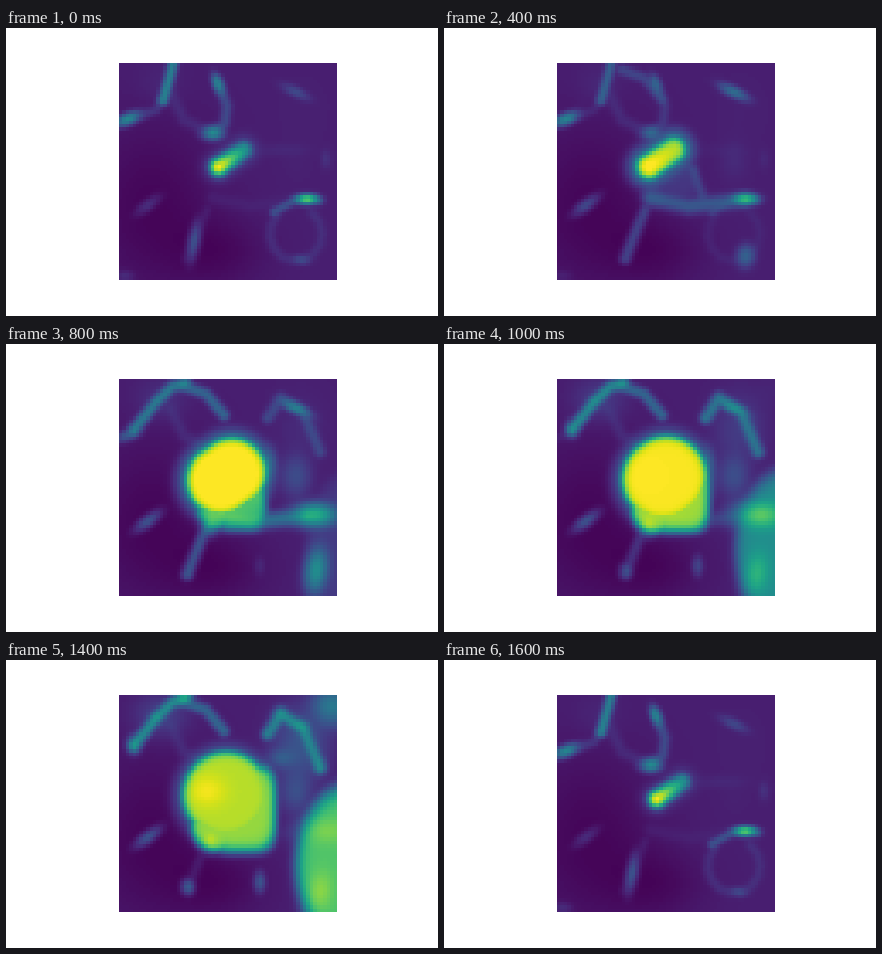
Write a matplotlib script that moves like this. It is 432 px wide and 288 px high and loops after 1700 ms.

```python
import numpy as np
import matplotlib.pyplot as plt
from matplotlib.animation import FuncAnimation

W, H = 432, 288
LEFT, TOP, WIDE, HIGH = 113, 35, 218, 217
CELLS = 64
FRAMES = 17

step = (np.arange(CELLS) + 0.5) / CELLS
X, Y = np.meshgrid(LEFT + WIDE * step, TOP + HIGH * step)


def rise(t, mid, spread=1.0):
    """Smooth change from 0 to 1 around a depth."""
    return 1 / (1 + np.exp(-(t - mid) / spread))


def peak(t, mid, width):
    return np.exp(-0.5 * ((t - mid) / width) ** 2)


def to_segment(p, q):
    """Distance to the segment and the position along it."""
    dx, dy = q[0] - p[0], q[1] - p[1]
    s = ((X - p[0]) * dx + (Y - p[1]) * dy) / (dx * dx + dy * dy + 1e-9)
    s = np.clip(s, 0, 1)
    return np.hypot(X - p[0] - s * dx, Y - p[1] - s * dy), s


def blob(x, y, sx, sy, amp, angle=0):
    a = np.radians(angle)
    u = (X - x) * np.cos(a) + (Y - y) * np.sin(a)
    v = (Y - y) * np.cos(a) - (X - x) * np.sin(a)
    return amp * np.exp(-0.5 * ((u / sx) ** 2 + (v / sy) ** 2))


def strand(points, amp, width=4.5):
    dist = np.min([to_segment(p, q)[0] for p, q in zip(points, points[1:])], axis=0)
    return amp * np.exp(-0.5 * (dist / width) ** 2)


def plateau(depth_inside, soft):
    return 1 / (1 + np.exp(-np.clip(depth_inside / soft, -50, 50)))


def box(x, y, rx, ry, amp, power=4, soft=2.5):
    """Flat-topped rounded box, or an ellipse when power is 2."""
    q = (np.abs((X - x) / rx) ** power + np.abs((Y - y) / ry) ** power) ** (1 / power)
    return amp * plateau((1 - q) * min(rx, ry), soft)


def nodule(t, late, last):
    """Two joined spots that swell into one round body, with its glow."""
    big = rise(t, 6.5, 1.3)
    radius = 8 + 36 * big
    x = 213 - 10 * peak(t, 5, 2) + 7 * big
    y = 139 - 4 * big
    reach = 1 - big ** 2
    dist, s = to_segment((x, y), (x + 25 * reach, y - 17 * reach))
    tip = 0.5 + 0.5 * rise(t, 3)
    level = (1 + (tip - 1) * s) * (1 - 0.13 * last)
    soft = 2.6
    body = level * plateau(radius - dist, soft) / rise(radius, 0, soft)

    fill = 0.95 * rise(t, 6.5, 1.5) - 0.12 * last
    corner = box(234 + 2 * last, 152 - 4 * last, 20 + 14 * late,
                 18 + 17 * rise(t, 6.5, 0.7) + 9 * last, fill)
    heel_r = 14 + 11 * late
    heel = box(210, 166, heel_r, heel_r, fill, power=2)
    glow = (0.15 + 0.25 * peak(t, 5.5, 2.5) + 0.1 * late) * plateau(radius + 9 - dist, 4.5)
    return np.maximum(np.maximum(body, corner), heel), glow


def upper_left(t, early, mid, late, last):
    return [
        strand([(167, 36), (163, 52), (157, 72)], 0.43 * early),
        strand([(157, 72), (150, 82), (134, 88)], 0.15 * early),
        blob(122, 91, 11, 5, 0.45 * (1 - late), angle=-22),
        strand([(128, 86), (150, 58), (166, 43), (179, 39)], 0.46 * rise(t, 6.3), 5),
        blob(178, 37, 8, 4, 0.5 * last),
        blob(128, 84, 6, 8, 0.35 * late),
        blob(150, 58, 7, 6, 0.3 * late),
        blob(155, 55, 25, 20, 0.08 + 0.1 * late),
        strand([(165, 65), (178, 92), (205, 105)], 0.11, 6),
        strand([(178, 42), (200, 50), (218, 71)], 0.32 * rise(t, 3.5), 5),
        blob(212, 56, 4.5, 9, 0.42 * early, angle=-22),
        strand([(211, 52), (221, 78), (219, 95), (208, 104)], 0.22 * early, 5),
        blob(207, 105, 9, 6, 0.45 * early),
    ]


def upper_right(t, early, mid, late, last):
    return [
        blob(290, 64, 14, 5, 0.2 + 0.2 * rise(t, 3) - 0.15 * last, angle=26),
        strand([(262, 74), (275, 54), (297, 68), (314, 108)], 0.42 * rise(t, 8), 5.5),
        blob(275, 54, 7, 7, 0.35 * last),
        blob(296, 67, 7, 7, 0.35 * last),
        blob(276, 98, 13, 9, 0.28 * last),
        blob(314, 105, 6, 8, 0.3 * last),
        blob(295, 85, 25, 35, 0.04 + 0.14 * late + 0.08 * last),
        blob(326, 46, 18, 18, 0.42 * last),
        blob(290, 132, 14, 20, 0.05 + 0.18 * rise(t, 5)),
        blob(320, 131, 5, 9, 0.13 * early),
        blob(275, 122, 30, 6, 0.09 * early),
        blob(263, 118, 7, 14, 0.3 * peak(t, 9, 2)),
    ]


def below(t, early, mid, late, last):
    return [
        strand([(201, 182), (190, 208), (181, 231)], 0.07 + 0.22 * mid),
        blob(188, 213, 4.5, 15, 0.26 * (1 - rise(t, 3)), angle=10),
        blob(182, 227, 5, 6, 0.28 * late),
        blob(204, 181, 7, 8, 0.5 * rise(t, 6.5)),
        strand([(207, 170), (245, 178), (300, 172)], 0.07 + 0.36 * mid, 7),
        strand([(249, 142), (258, 167)], 0.34 * mid, 5),
        blob(142, 177, 12, 4.5, 0.12 + 0.13 * rise(t, 3), angle=-36),
        blob(254, 222, 5, 9, 0.26 * late),
        blob(119, 248, 8, 5, 0.12 * early),
    ]


def lower_right(t, early, mid, late, last):
    ring = [(290 + 26 * np.cos(a), 206 + 27 * np.sin(a))
            for a in np.linspace(-0.9, 3.9, 12)]
    grown = rise(t, 7.5, 1.4)
    return [
        blob(301 + 20 * late, 171, 9 + 15 * grown, 4 + 10 * grown,
             0.74 - 0.15 * mid - 0.3 * last),
        strand([(268, 184), (288, 173), (314, 173)], 0.24 * early, 4),
        strand(ring, 0.12 * early, 5),
        blob(294 + 20 * rise(t, 5, 2), 232 - 7 * mid, 8 + 5 * late,
             4 + 18 * rise(t, 5, 1.5), 0.19 + 0.33 * rise(t, 5, 1.5), angle=8),
        box(345, 205, 25 + 30 * rise(t, 7), 80, 0.73 * rise(t, 9.3), power=2, soft=4),
    ]


ground = (0.085 - blob(145, 180, 50, 65, 0.07)
          - blob(215, 225, 35, 25, 0.05)).clip(0)


def picture(t):
    early = 1 - rise(t, 5, 1.2)
    mid = peak(t, 6.5, 2.3)
    late = rise(t, 8.5, 1.2)
    last = rise(t, 11.5, 0.9)
    parts = [ground, *nodule(t, late, last)]
    for group in (upper_left, upper_right, below, lower_right):
        parts += group(t, early, mid, late, last)
    blend = 2.6
    mixed = np.sum(np.clip(parts, 0, None) ** blend, axis=0) ** (1 / blend)
    return np.clip(mixed + blob(201, 131, 13, 11, 0.1 * last), 0, 1)


fig = plt.figure(figsize=(W / 72, H / 72), dpi=72, facecolor="white")
ax = fig.add_axes([LEFT / W, 1 - (TOP + HIGH) / H, WIDE / W, HIGH / H])
ax.axis("off")
image = ax.imshow(picture(0), cmap="viridis", vmin=0, vmax=1,
                  interpolation="nearest", aspect="auto")


def update(i):
    # the loop closes on the slice just before the first
    image.set_data(picture(-1 if i == FRAMES - 1 else i))
    return [image]


anim = FuncAnimation(fig, update, frames=FRAMES, interval=100,
                     repeat=True, repeat_delay=0)
plt.show()
```
